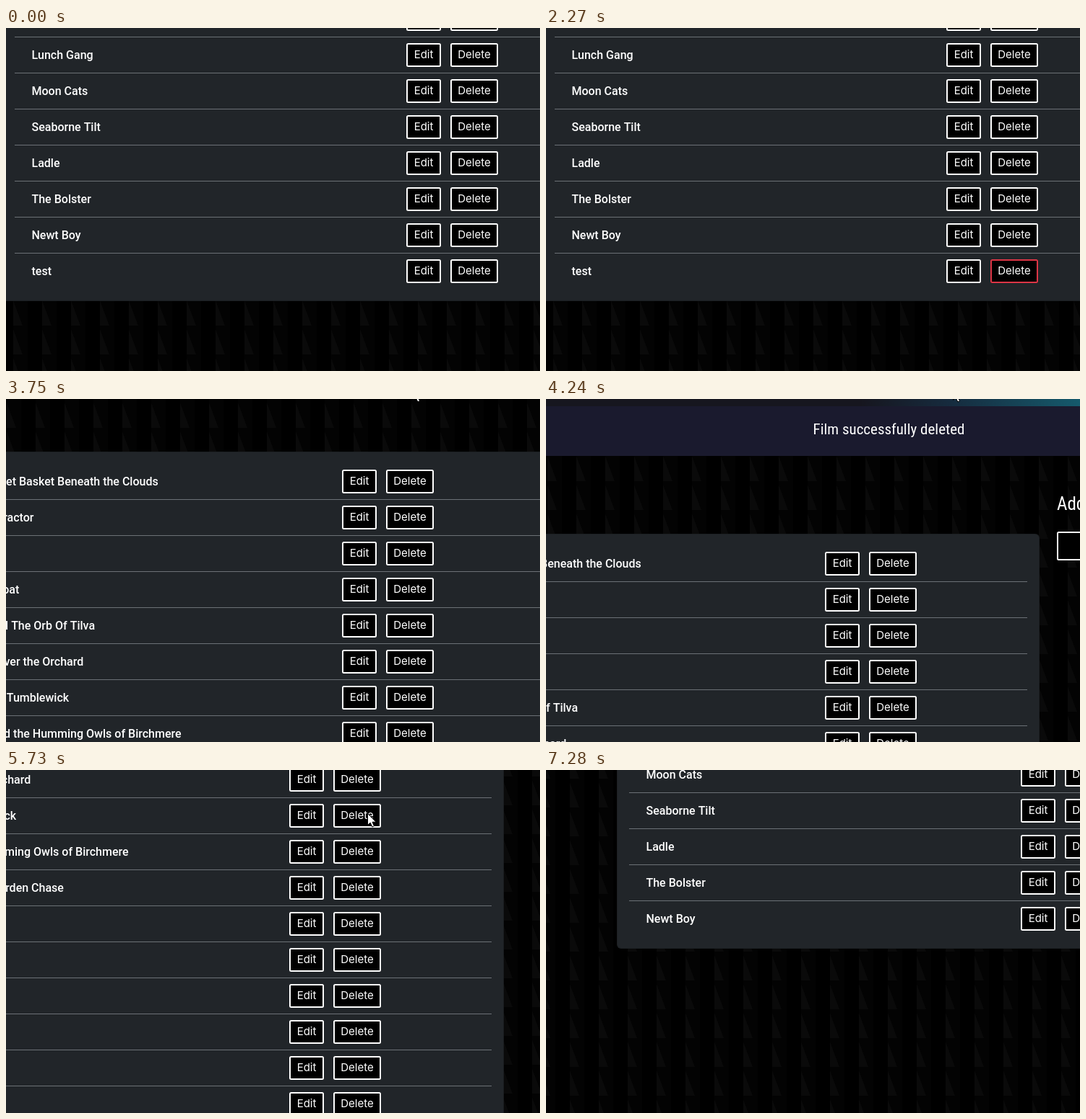
Animation of 739x476 px, one loop 7.84 s. Source, as an HTML page with a canvas:

```html
<!DOCTYPE html>
<html lang="en">
<head>
<meta charset="utf-8">
<title>Film list</title>
<style>
  html, body { margin: 0; width: 100%; height: 100%; overflow: hidden; background: #000; }
  canvas { display: block; }
</style>
</head>
<body>
<canvas id="stage" width="739" height="476"></canvas>
<script>
const W = 739, H = 476, LOOP = 7840, ROW = 50, TILE = 40;
const DELETED_AT = 2560;
const ctx = document.getElementById('stage').getContext('2d');

const films = [
  'Our Quiet Basket Beneath the Clouds', 'Brisk Tractor', 'Ek', 'Finn Moat',
  'B-4 And The Orb Of Tilva', 'Dusk Over the Orchard', 'Corwin Tumblewick',
  'Ned and the Humming Owls of Birchmere', 'Otto’s Peculiar Garden Chase',
  'Otter Procession', 'Quilted Harbor', 'Lunch Gang', 'Moon Cats',
  'Seaborne Tilt', 'Ladle', 'The Bolster', 'Newt Boy', 'test'
];

const ramp = (t, from, to) => Math.min(1, Math.max(0, (t - from) / (to - from)));
const glide = (t, from, to) => {
  const p = ramp(t, from, to);
  return p * p * (3 - 2 * p);
};
const mod = (a, n) => ((a % n) + n) % n;

// Wheel scrolling moves the page; dragging the viewport shifts it both ways.
function viewAt(t) {
  const up = 5 * glide(t, 2560, 3100);
  const down = 5 * glide(t, 5440, 5810) + 3 * glide(t, 5990, 6230);
  const haul = 0.74 * glide(t, 3570, 3850) + 0.26 * glide(t, 4060, 4240);
  const nudge = glide(t, 4930, 5090);
  const pull = glide(t, 6330, 6870);
  return {
    left: Math.round(554 - 168 * haul + 6 * nudge + 265 * pull),
    top: Math.round(-513 + 100 * (up - down) + 241 * haul - 24 * nudge + 2 * pull)
  };
}

function pointerAt(t) {
  let x = 655, y = 482;
  const go = (from, to, toX, toY) => {
    const p = glide(t, from, to);
    x += (toX - x) * p;
    y += (toY - y) * p;
  };
  go(40, 560, 639, 345);      // to the Delete button
  go(1150, 1350, 690, -22);   // up to the dialog
  go(2900, 3100, 563, -15);   // title bar
  go(5420, 5440, 558, -12);
  go(5440, 5700, 500, 60);    // over the list
  go(6050, 6250, 227, 37);
  go(6250, 6340, 222, -22);   // title bar again
  go(7090, 7280, 577, 482);   // out at the bottom
  return [Math.round(x), Math.round(y)];
}

function rect(x, y, w, h, fill) {
  ctx.fillStyle = fill;
  ctx.fillRect(x, y, w, h);
}

function text(str, x, y, font, align = 'left') {
  ctx.font = font;
  ctx.textAlign = align;
  ctx.fillStyle = '#fff';
  ctx.fillText(str, x, y);
}

// Rounded box with its border inside the given bounds.
function box(x, y, w, h, radius, fill, stroke, line) {
  ctx.beginPath();
  ctx.roundRect(x, y, w, h, radius);
  ctx.fillStyle = fill;
  ctx.fill();
  ctx.beginPath();
  ctx.roundRect(x + line / 2, y + line / 2, w - line, h - line, radius - line / 2);
  ctx.lineWidth = line;
  ctx.strokeStyle = stroke;
  ctx.stroke();
}

function button(label, x, cy, w, stroke = '#fff') {
  box(x, cy - 16, w, 33, 2.5, '#000', stroke, 2);
  text(label, x + w / 2, cy + 5, '15px Montserrat, Inter, sans-serif', 'center');
}

function backdrop(left, top) {
  rect(0, 0, W, H, '#000');
  for (let x = mod(left + 16, TILE) - TILE; x < W; x += TILE) {
    rect(x, 0, 20, H, '#030303');
    ctx.fillStyle = '#0a0a0a';
    for (let y = mod(top + 6, TILE); y < H + TILE; y += TILE) {
      ctx.beginPath();
      ctx.moveTo(x, y - 35);
      ctx.lineTo(x + 13, y);
      ctx.lineTo(x, y);
      ctx.fill();
    }
  }
}

function header(left, top) {
  const barTop = top - 218;
  const glow = ctx.createLinearGradient(left + 50, 0, left + 353, 0);
  glow.addColorStop(0, '#16161f');
  glow.addColorStop(0.4, '#162b3e');
  glow.addColorStop(1, '#155a6c');
  if (barTop > 0) rect(0, 0, W, barTop, glow);
  rect(0, barTop, W, 69, '#1a1a2e');
  const face = "'Barlow Condensed', 'Roboto Condensed', Roboto, sans-serif";
  text('Film successfully deleted', left + 88.5, top - 179, 'condensed 21px ' + face, 'center');
  text('Add film', left + 321, top - 74, 'condensed 25px ' + face);
  box(left + 321, top - 44, 260, 40, 2.5, '#000', '#fff', 2);
}

function list(left, top, t) {
  const count = films.length - (t < DELETED_AT ? 0 : 1);
  box(left - 559, top - 41, 856, (count - 1) * ROW + 83, 6, '#212529', 'rgba(0,0,0,0.15)', 1);

  const hot = ramp(t, 360, 510);
  const alert = `rgb(${255 - 35 * hot},${255 - 202 * hot},${255 - 186 * hot})`;

  for (let i = 0; i < count; i++) {
    const y = top + i * ROW;
    text(films[i], left - 518.5, y + 6, '500 16px Roboto, sans-serif');
    button('Edit', left, y, 48);
    button('Delete', left + 61, y, 66, films[i] === 'test' ? alert : '#fff');
    if (i < count - 1) rect(left - 542, y + 25, 822, 1, '#6c7176');
  }
}

function arrow(x, y) {
  ctx.save();
  ctx.translate(x, y);
  const shape = new Path2D('M.5 .5v16l3.7-3.3 2.6 5.8 2.7-1.2-2.5-5.6h5z');
  ctx.fillStyle = '#fff';
  ctx.fill(shape);
  ctx.lineWidth = 1;
  ctx.strokeStyle = '#000';
  ctx.stroke(shape);
  ctx.restore();
}

function draw(t) {
  const { left, top } = viewAt(t);
  backdrop(left, top);
  header(left, top);
  list(left, top, t);
  const dim = 0.6 * (ramp(t, 800, 940) - ramp(t, 2130, 2270));
  if (dim > 0) rect(0, 0, W, H, `rgba(0,0,0,${dim})`);
  arrow(...pointerAt(t));
}

const start = performance.now();
function tick() {
  draw((performance.now() - start) % LOOP);
  requestAnimationFrame(tick);
}
tick();
</script>
</body>
</html>
```
